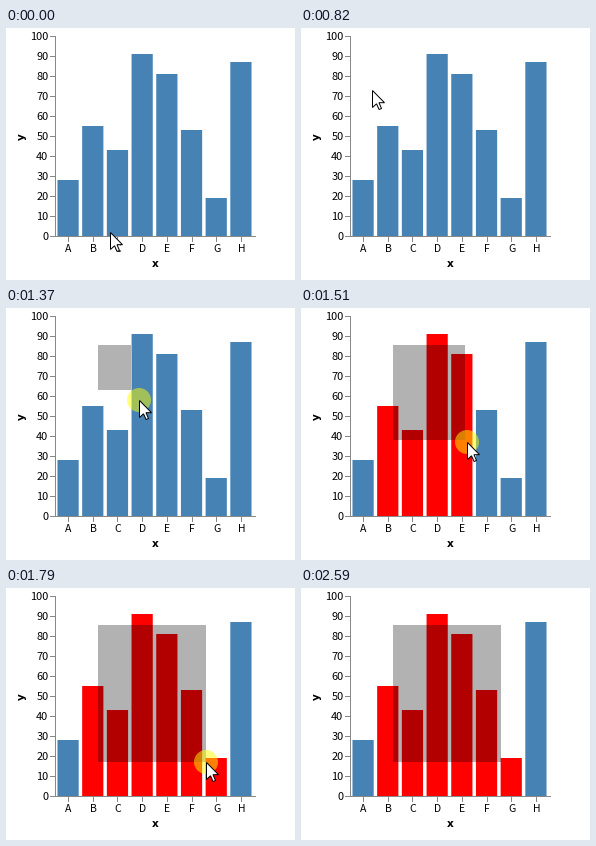
A matplotlib script that plays this animation: 289 by 252 pixels, repeating every 2940 ms.

```python
import matplotlib.pyplot as plt
import numpy as np
from matplotlib.animation import FuncAnimation
from matplotlib.patches import Circle, Polygon, Rectangle

W, H, DPI = 289, 252, 64
PX = 72 / DPI
LOOP_MS, FRAME_MS, TICK_MS = 2940, 10, 70

LEFT, TOP, SIZE = 49, 8, 200
BASE = TOP + SIZE
VALUES = dict(A=28, B=55, C=43, D=91, E=81, F=53, G=19, H=87)
BAND = SIZE / (len(VALUES) + 0.1)
BAR_W = 0.9 * BAND - 1

PRESS, DRAG, RELEASE = 1090, 1160, 2120
HOME, CORNER, END = (104, 204), (92, 37), (200, 174)
DRAG_PATH = (DRAG, 10, CORNER, (142, 108), END)
# Start in ms, number of ticks, then a quadratic curve of three points
MOVES = [
    (70, 6, HOME, (45, 90), (62, 73)),
    (820, 3, (62, 73), (77, 55), CORNER),
    DRAG_PATH,
    (2450, 3, END, (234, 216), (268, 259)),
]
ARROW = np.array([(0, 0), (0, 17), (4, 13.3), (6.6, 19), (9, 18),
                  (6.5, 12.2), (12, 12.2)])

fig = plt.figure(figsize=(W / DPI, H / DPI), dpi=DPI, facecolor="white")
ax = fig.add_axes([0, 0, 1, 1])
ax.set(xlim=(0, W), ylim=(H, 0))
ax.axis("off")


def box(x, y, w, h, color, **kw):
    return ax.add_patch(Rectangle((x, y), w, h, fc=color, lw=0, **kw))


def label(x, y, text, ha="center", **kw):
    style = dict(family="Noto Sans CJK JP", size=11 * PX, va="baseline")
    ax.text(x, y, text, ha=ha, **{**style, **kw})


bars = []
for i, (name, value) in enumerate(VALUES.items()):
    x = LEFT + BAND * (i + 0.1)
    bars.append(box(x, BASE - 2 * value, BAR_W, 2 * value, "steelblue", snap=False))
    middle = x + 0.45 * BAND
    box(int(middle), BASE, 1, 6, "#888888")
    label(middle, 224, name, size=10.5 * PX)

for value in range(0, 101, 10):
    y = BASE - 2 * value
    box(LEFT - 5, y, 5, 1, "#888888")
    label(42.5, y + 4, value, ha="right")
box(LEFT, TOP, 1, SIZE + 1, "#888888")
box(LEFT, BASE, SIZE + 1, 1, "#888888")

title = dict(family="DejaVu Sans", weight="bold", size=10.5 * PX)
label(149.5, 239, "x", **title)
label(15.5, 109, "y", rotation=90, **{**title, "va": "center"})

brush = box(*CORNER, 0, 0, "black", alpha=0.3, zorder=3)
halo = ax.add_patch(Circle(CORNER, 12, fc="#ffff00", alpha=0.5, lw=0))
arrow = ax.add_patch(Polygon(ARROW, fc="white", ec="black", lw=PX,
                             joinstyle="miter", zorder=5))


def glide(t):
    t = 1 - (1 - t) ** 1.1
    return t * t * (3 - 2 * t)


def slow_start(t):
    return t ** 3 * (10 - 15 * t + 6 * t * t)


def along(move, ms, ease):
    """Point on a curved move, advancing once per tick."""
    start, ticks, a, b, c = move
    t = ease(np.clip((ms - start) // TICK_MS + 1, 0, ticks) / ticks)
    a, b, c = map(np.array, (a, b, c))
    return (1 - t) ** 2 * a + 2 * t * (1 - t) * b + t * t * c


def pointer_at(ms):
    begun = [move for move in MOVES if move[0] <= ms]
    return along(begun[-1] if begun else MOVES[0], ms, glide)


def draw(frame):
    ms = frame * FRAME_MS
    tip = pointer_at(ms).round()
    arrow.set_xy(ARROW + tip + 0.5)
    halo.center = tip
    halo.set_visible(PRESS <= ms < RELEASE)
    # The click highlight covers the pointer until the drag begins
    halo.set_zorder(6 if ms < DRAG else 4)

    right, bottom = along(DRAG_PATH, ms, slow_start)
    brush.set_width(right - CORNER[0])
    brush.set_height(bottom - CORNER[1])
    brush.set_visible(ms >= DRAG)
    for bar in bars:
        hit = (bar.get_x() < right and bar.get_x() + BAR_W > CORNER[0]
               and bar.get_y() < bottom)
        bar.set_facecolor("red" if hit else "steelblue")
    return [*bars, brush, halo, arrow]


anim = FuncAnimation(fig, draw, frames=LOOP_MS // FRAME_MS, interval=FRAME_MS,
                     repeat=True, repeat_delay=0)
plt.show()
```
